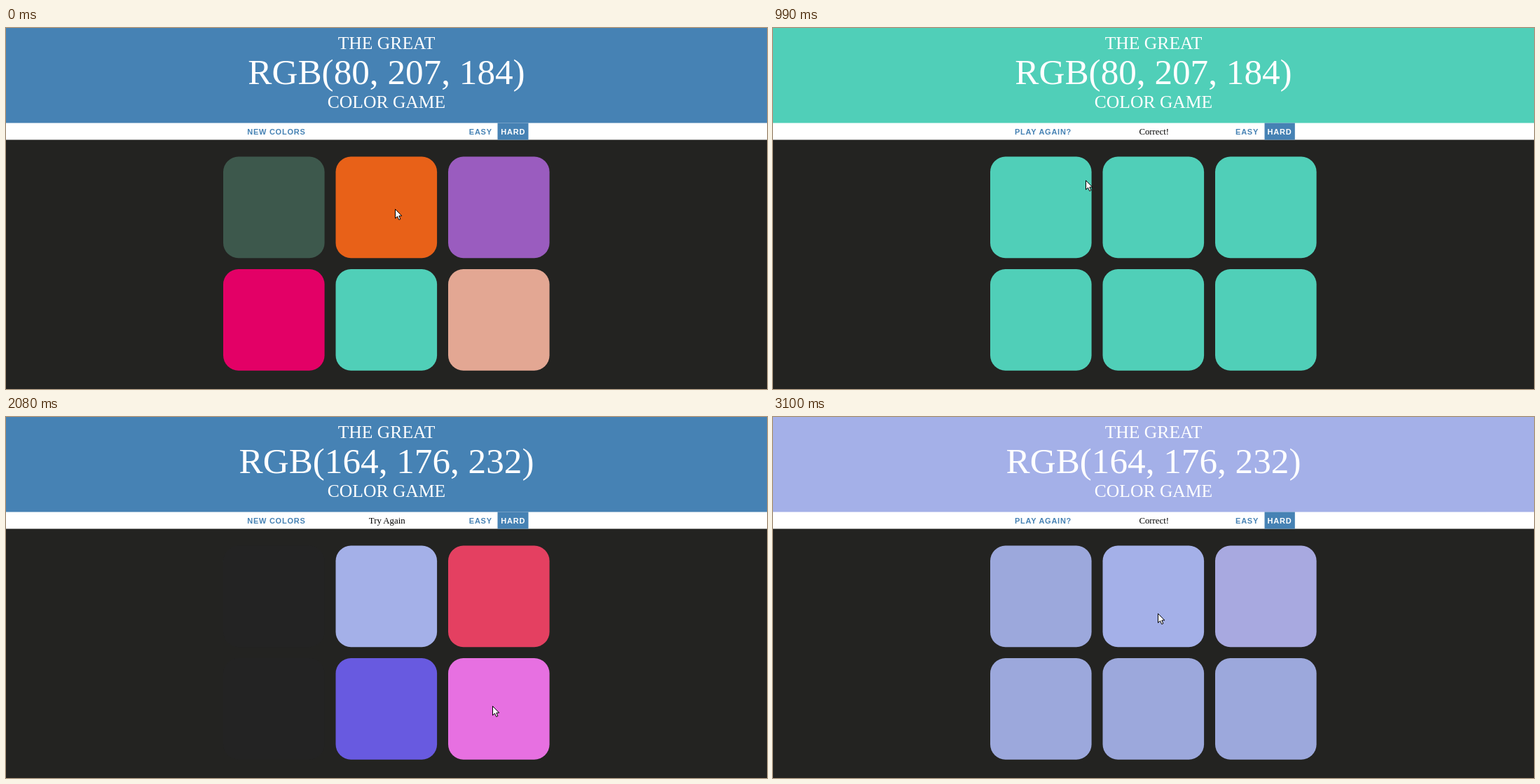
These frames come from a looping animation (1086x515 px, 3.17 s). An HTML page:

```html
<!DOCTYPE html>
<html lang="en">
<head>
<meta charset="utf-8">
<title>Color game</title>
<style>
  html, body { margin: 0; width: 100%; height: 100%; overflow: hidden; background: #232321; }
  svg { display: block; width: 1086px; height: 515px; }
  .title { font: 25.6px "Liberation Serif", "Times New Roman", serif; fill: #fff; text-anchor: middle; }
  .title .big { font-size: 51.2px; }
  #message { font: 12.8px "Liberation Serif", "Times New Roman", serif; fill: #000; text-anchor: middle; }
  .button { font: bold 11px "Liberation Sans", Arial, sans-serif; letter-spacing: .75px; fill: steelblue; }
  .button.on { fill: #fff; }
</style>
</head>
<body>
<svg viewBox="0 0 1086 515">
  <rect width="1086" height="515" fill="#232321"/>
  <rect id="header" width="1086" height="136"/>
  <g class="title">
    <text x="543" y="30">THE GREAT</text>
    <text id="goal" class="big" x="543" y="80"></text>
    <text x="543" y="114">COLOR GAME</text>
  </g>
  <rect y="135.5" width="1086" height="24" fill="#fff"/>
  <rect id="hover" x="339.7" y="135.5" width="91.3" height="24" fill="steelblue"/>
  <rect id="hardBox" x="701.5" y="135.5" height="24" fill="steelblue"/>
  <text id="reset" class="button" y="152"></text>
  <text id="message" x="543.7" y="152"></text>
  <text id="easy" class="button" y="152">EASY</text>
  <text id="hard" class="button on" y="152">HARD</text>
  <g id="squares"></g>
  <path id="cursor" d="M.5.5V13.6L3.5 10.8L5.7 15.5L7.9 14.6L5.8 10H9.8Z" fill="#fff" stroke="#000"/>
</svg>
<script>
const LOOP = 3170, TICKS = 41, LEAD = 26, FADE = 3;
const $ = id => document.getElementById(id);
const parse = hex => [1, 3, 5].map(i => parseInt(hex.slice(i, i + 2), 16));
const rgb = c => `rgb(${c.map(Math.round).join(", ")})`;
const mix = (a, b, k) => a.map((v, i) => v + (b[i] - v) * k);
const clamp = x => Math.min(1, Math.max(0, x));

const BACK = parse("#232323");
const rounds = [
  { goal: 4, colors: ["#3d584c", "#e86118", "#9a5cbf", "#e30066", "#50cfb8", "#e3a793"].map(parse) },
  { goal: 1, colors: ["#246546", "#a4b0e8", "#e44061", "#4ebdff", "#685ae0", "#ee73e8"].map(parse) }
];

// The player's clicks, with times in ticks; a click without a square hits the reset button.
const clicks = [
  { at: 0.9, x: 555, y: 258, square: 1 },
  { at: 3.8, x: 675, y: 262, square: 2 },
  { at: 9.9, x: 557, y: 368, square: 4 },
  { at: 14.84, x: 397, y: 149 },
  { at: 18.9, x: 394, y: 247, square: 0 },
  { at: 22.8, x: 385, y: 400, square: 3 },
  { at: 26.84, x: 694, y: 412, square: 5 },
  { at: 31.42, x: 586, y: 404, square: 4 },
  { at: 37.9, x: 549, y: 280, square: 1 }
];

const squares = rounds[0].colors.map((_, i) => {
  const rect = document.createElementNS("http://www.w3.org/2000/svg", "rect");
  const attrs = { x: 310 + 160.5 * (i % 3), y: 183.6 + 160.5 * Math.floor(i / 3), width: 144.6, height: 144.6, rx: 21.7 };
  for (const name in attrs) rect.setAttribute(name, attrs[name]);
  $("squares").append(rect);
  return rect;
});

// Same curve as the CSS "ease" keyword.
function ease(x) {
  const bezier = (a, b, u) => 3 * a * u * (1 - u) ** 2 + 3 * b * u * u * (1 - u) + u ** 3;
  let low = 0, high = 1;
  for (let i = 0; i < 20; i++) {
    const mid = (low + high) / 2;
    if (bezier(.25, .25, mid) < x) low = mid; else high = mid;
  }
  return bezier(.1, 1, low);
}

// The pointer rests briefly at each click and glides to the next.
function cursorAt(tick) {
  const next = clicks.find(c => c.at > tick) || clicks[clicks.length - 1];
  const last = clicks[Math.max(0, clicks.indexOf(next) - 1)];
  const k = clamp((tick - last.at - .3) / (next.at - last.at - .5));
  return mix([last.x, last.y], [next.x, next.y], k * k * (3 - 2 * k)).map(Math.round);
}

// Plays every click made so far.
function gameAt(tick) {
  let round = rounds[0], colors = round.colors, message = "", won = false;
  for (const { at, square } of clicks.filter(c => c.at <= tick)) {
    const reset = square === undefined;
    if (reset) round = rounds[1];
    won = square === round.goal;
    message = reset ? "" : won ? "Correct!" : "Try Again";
    const fade = ease(clamp((tick - at) / FADE));
    colors = colors.map((color, i) => {
      if (reset) return mix(color, round.colors[i], fade);
      if (won) return mix(color, round.colors[round.goal], fade);
      return i === square ? mix(color, BACK, fade) : color;
    });
  }
  return { goal: round.colors[round.goal], colors, message, won };
}

function draw(tick) {
  const { goal, colors, message, won } = gameAt(tick);
  const [x, y] = cursorAt(tick);
  const hover = x >= 340 && x < 431 && y >= 136 && y < 160;
  const shift = won ? .7 : 0;

  $("header").setAttribute("fill", won ? rgb(goal) : "steelblue");
  $("goal").textContent = rgb(goal).toUpperCase();
  $("message").textContent = message;
  $("reset").textContent = won ? "PLAY AGAIN?" : "NEW COLORS";
  $("reset").setAttribute("x", 344.2 + shift);
  $("reset").classList.toggle("on", hover);
  $("hover").setAttribute("visibility", hover ? "visible" : "hidden");
  $("easy").setAttribute("x", 660.8 - shift);
  $("hard").setAttribute("x", 706.3 - shift);
  $("hardBox").setAttribute("width", 44 - shift);
  squares.forEach((rect, i) => rect.setAttribute("fill", rgb(colors[i])));
  $("cursor").setAttribute("transform", `translate(${x} ${y})`);
}

const begin = performance.now();
function play() {
  const ms = Math.max(0, performance.now() - begin) % LOOP;
  draw(Math.min(TICKS - 1, Math.floor((ms + LEAD) / LOOP * TICKS)));
  requestAnimationFrame(play);
}
play();
</script>
</body>
</html>
```
